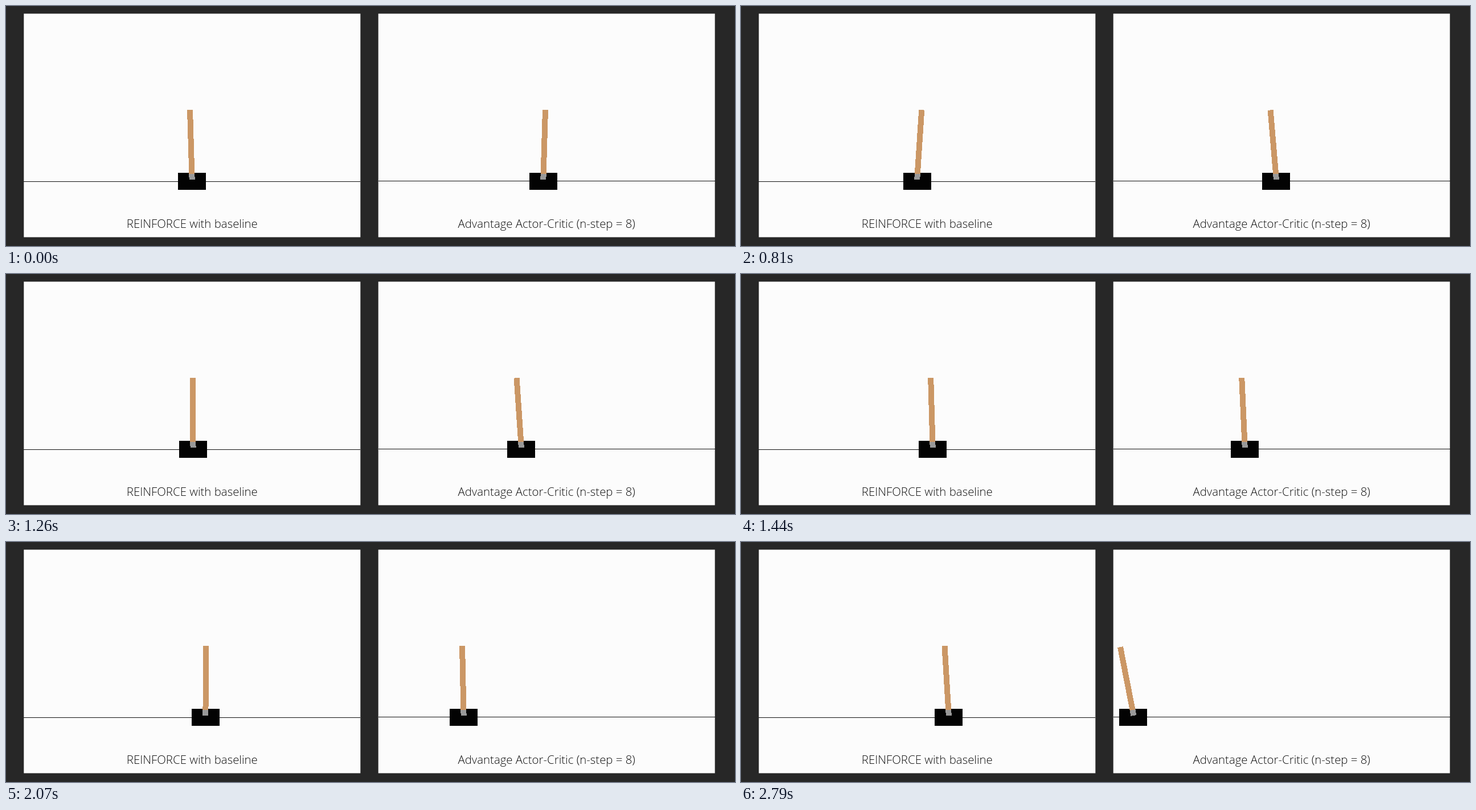
Write an HTML page that moves like this. It is 1280 px wide and 423 px high and loops after 2.88 s.

```html
<!DOCTYPE html>
<html lang="en">
<head>
<meta charset="utf-8">
<title>Cart-pole comparison</title>
<style>
  html, body { margin: 0; width: 100%; height: 100%; overflow: hidden; background: #272727; }
  svg { display: block; width: 1280px; height: 423px; }
  .cart, .pole, .rail { shape-rendering: crispEdges; }
  text { font: 300 20.4px "Open Sans", sans-serif; fill: #111; text-anchor: middle; }
</style>
</head>
<body>
<svg id="stage" viewBox="0 0 1280 423"></svg>
<script>
const STEP = 90, STEPS = 32, POLE = 118, PIVOT_Y = 301;

// cart: centre x, lean: horizontal offset of the pole tip; both evenly spaced over the loop.
const panels = [
  { x: 31.3, railY: 309, label: 'REINFORCE with baseline',
    cart: [326.5, 312, 311, 335, 347.4, 353.6, 364.5],
    lean: [-3.5, 4.5, 7.4, -3, -1.5, 1.2, -7] },
  { x: 653.7, railY: 308, label: 'Advantage Actor-Critic (n-step = 8)',
    cart: [943.5, 949.5, 933, 890, 825, 776, 688.5],
    lean: [3.5, -5, -10.5, -6, 2.5, -11.5, -22.5] },
];

const rect = (x, y, w, h, fill, name = '') =>
  `<rect class="${name}" x="${x}" y="${y}" width="${w}" height="${h}" fill="${fill}"/>`;

stage.innerHTML = panels.map(({ x, railY, label }) => `
  ${rect(x, 13.5, 591, 394, '#fcfcfc')}
  ${rect(x, railY, 591, 1, '#111', 'rail')}
  ${rect(0, 294, 49, 30, '#030303', 'cart')}
  <g class="pole">
    ${rect(-5, -POLE, 10, POLE - 5, '#cb9765')}
    ${rect(-5, -5, 10, 10, '#999')}
  </g>
  <text x="${x + 295.5}" y="391">${label}</text>`).join('');

const carts = stage.querySelectorAll('.cart');
const poles = stage.querySelectorAll('.pole');

// Smooth curve through evenly spaced points, for progress 0..1.
function curve(points, progress) {
  const last = points.length - 1;
  const i = Math.min(Math.floor(progress * last), last - 1);
  const u = progress * last - i, v = 1 - u;
  const slope = k => {
    const from = Math.max(k - 1, 0), to = Math.min(k + 1, last);
    return (points[to] - points[from]) / (to - from);
  };
  return v * v * (1 + 2 * u) * points[i] + u * u * (1 + 2 * v) * points[i + 1]
    + u * v * (v * slope(i) - u * slope(i + 1));
}

function draw() {
  const progress = Math.floor(performance.now() / STEP) % STEPS / (STEPS - 1);
  panels.forEach(({ cart, lean }, i) => {
    const left = Math.round(curve(cart, progress) - 24.5);
    const angle = Math.asin(curve(lean, progress) / POLE) * 180 / Math.PI;
    carts[i].setAttribute('x', left);
    poles[i].setAttribute('transform', `translate(${left + 24.5} ${PIVOT_Y}) rotate(${angle})`);
  });
  requestAnimationFrame(draw);
}
draw();
</script>
</body>
</html>
```
